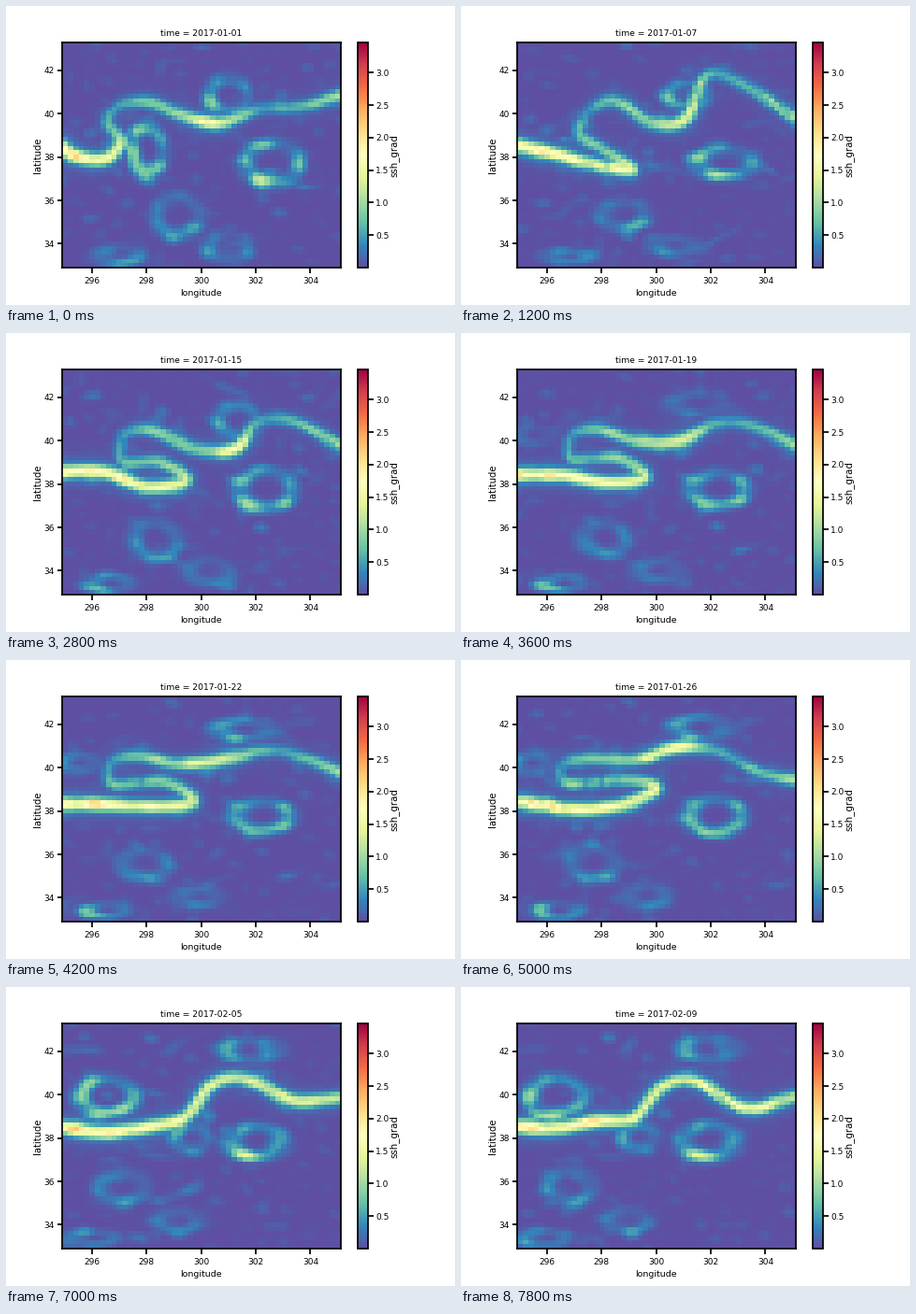
Recreate the animation shown at these times as a matplotlib script. Size 480 by 320 pixels, loop 8 s.

```python
import math

import matplotlib.pyplot as plt
import numpy as np
from matplotlib.animation import FuncAnimation

W, H, DPI = 480, 320, 100
LEFT, RIGHT, TOP, BOTTOM = 60, 357.5, 38.5, 280
NX, NY, DAYS, VMAX = 51, 52, 40, 3.474

# Cell centres in stage pixels, y downwards.
X, Y = np.meshgrid(
    LEFT + (np.arange(NX) + 0.5) * (RIGHT - LEFT) / NX,
    BOTTOM - (np.arange(NY) + 0.5) * (BOTTOM - TOP) / NY,
)

# Centre line of the folded jet on a few days, and of the jet after the fold pinches off.
FOLDED = {
    0: [(58, 150), (75, 161), (105, 164), (123, 148), (118, 137), (108, 124), (122, 107),
        (152, 103), (185, 116), (225, 126), (270, 111), (315, 108), (360, 95)],
    6: [(58, 149), (95, 157), (130, 167), (182, 176), (152, 154), (126, 136), (138, 112),
        (165, 102), (205, 126), (240, 121), (262, 75), (303, 85), (360, 123)],
    14: [(58, 149), (105, 149), (150, 165), (192, 158), (165, 139), (125, 137), (127, 110),
         (155, 104), (200, 124), (245, 124), (268, 96), (308, 95), (360, 123)],
    21: [(58, 154), (110, 155), (160, 157), (200, 152), (170, 131), (115, 133), (112, 110),
         (142, 103), (185, 112), (228, 108), (278, 97), (315, 104), (360, 122)],
    25: [(58, 151), (120, 160), (170, 156), (208, 138), (180, 129), (115, 132), (108, 113),
         (135, 106), (185, 107), (230, 94), (275, 98), (320, 121), (360, 129)],
}
OPEN = {
    31: [(58, 151), (110, 160), (165, 155), (200, 137), (225, 102), (265, 97), (310, 114), (360, 121)],
    39: [(58, 149), (95, 152), (145, 144), (185, 140), (215, 107), (250, 101), (305, 130), (360, 117)],
}
FOLDED_POWER = (2.1, 1.9, 1.7, 1.4, 0.9, 0.7, 0.45, 0.9, 1.0, 1.6, 0.6, 0.7, 1.1)
OPEN_POWER = (1.9, 2.0, 1.9, 1.6, 1.5, 1.4, 1.6, 1.1)

# Eddies: first day, last day, start, end, radii, strength.
EDDIES = (
    (-9, 49, (289, 169), (260, 165), (28, 17), 0.55),
    (-9, 49, (199, 228), (100, 210), (23, 16), 0.3),
    (-9, 49, (250, 259), (163, 248), (20, 10), 0.24),
    (-9, 49, (128, 267), (84, 269), (20, 7), 0.28),
    (-4, 4, (152, 152), (150, 155), (17, 20), 0.6),
    (-4, 18, (235, 97), (250, 94), (20, 15), 0.36),
    (16, 49, (250, 77), (272, 61), (27, 11), 0.36),
    (24, 49, (122, 117), (88, 118), (28, 20), 0.6),
    (26, 49, (217, 166), (167, 153), (17, 14), 0.28),
    (16, 30, (78, 110), (74, 112), (18, 9), 0.3),
)


def smooth(u):
    u = np.clip(u, 0, 1)
    return u * u * (3 - 2 * u)


def keyed(track, day):
    days = list(track)
    pts = np.array(list(track.values()), float)
    i = int(np.clip(np.searchsorted(days, day, "right") - 1, 0, len(days) - 2))
    u = np.clip((day - days[i]) / (days[i + 1] - days[i]), 0, 1)
    return pts[i] + (pts[i + 1] - pts[i]) * u


def spline(pts, n=9):
    """Catmull-Rom curve through the points."""
    p = np.vstack([2 * pts[0] - pts[1], pts, 2 * pts[-1] - pts[-2]])
    u = np.linspace(0, 1, n)[:, None]
    return np.vstack([
        b + 0.5 * u * (c - a + u * (2 * a - 5 * b + 4 * c - d + u * (3 * (b - c) + d - a)))
        for a, b, c, d in zip(p, p[1:], p[2:], p[3:])
    ])


def ridge(track, power, day):
    pts = np.column_stack([keyed(track, day), power])
    x, y, amp = spline(pts).T[:, :, None, None]
    d2 = (X - x) ** 2 + (Y - y) ** 2
    return (amp * (0.88 * np.exp(-d2 / 38) + 0.12 * np.exp(-d2 / 260))).max(axis=0)


def eddy(day, first, last, start, end, radii, amp):
    """A ring that drifts, breathes and is brighter on its south-west side."""
    u = (day - first) / (last - first)
    x, y = np.array(start) * (1 - u) + np.array(end) * u
    rx, ry = radii
    ry *= 1 + 0.25 * math.cos(0.45 * day) * math.exp(-day / 25)
    gap = (np.hypot((X - x) / rx, (Y - y) / ry) - 1) * math.sqrt(rx * ry)
    side = 1 + 0.4 * np.cos(np.arctan2(Y - y, X - x) - math.radians(130))
    fade = smooth((day - first) / 4) * smooth((last - day) / 4)
    return fade * amp * side * np.exp(-gap**2 / 65)


rng = np.random.default_rng(7)
STREAKS = [
    (rng.uniform(LEFT, RIGHT), rng.uniform(TOP, BOTTOM), rng.uniform(10, 26), rng.uniform(3, 6),
     rng.uniform(-0.5, 0.6), rng.uniform(0.1, 0.24), rng.uniform(0, DAYS))
    for _ in range(34)
]
WAVES = [
    (rng.uniform(0.08, 0.35), rng.uniform(0, math.tau), rng.uniform(0, math.tau), rng.uniform(-0.3, 0.3))
    for _ in range(14)
]


def streak(day, x, y, rx, ry, tilt, amp, peak):
    """A faint patch that drifts west and lives for about two weeks."""
    c, s = math.cos(tilt), math.sin(tilt)
    dx, dy = X - x + 0.8 * (day - peak), Y - y
    r2 = ((dx * c + dy * s) / rx) ** 2 + ((dy * c - dx * s) / ry) ** 2
    return amp * smooth(1 - abs(day - peak) / 9) * np.exp(-r2)


def ripple(day):
    total = sum(
        np.sin(k * (X * math.cos(a) + Y * math.sin(a)) + phase + speed * day)
        for k, a, phase, speed in WAVES
    )
    return total / math.sqrt(len(WAVES) / 2)


def field(day):
    pinch = smooth((day - 25) / 6)
    noise = ripple(day)
    jet = np.maximum((1 - pinch) * ridge(FOLDED, FOLDED_POWER, day), pinch * ridge(OPEN, OPEN_POWER, day))
    faint = [eddy(day, *e) for e in EDDIES] + [streak(day, *s) for s in STREAKS]
    faint = np.max(faint, axis=0) * np.clip(1 + 0.35 * noise, 0.2, 1.7)
    return np.maximum(jet * (1 + 0.08 * noise), faint) + 0.02 * noise**2


def px(n):
    return n * 72 / DPI


def box(x0, y0, x1, y1):
    return [x0 / W, 1 - y1 / H, (x1 - x0) / W, (y1 - y0) / H]


def label(x, y, text, size, rotation=0):
    return fig.text(x / W, 1 - y / H, text, fontsize=px(size), rotation=rotation,
                    ha="center", va="center")


plt.rcParams.update({"font.family": "DejaVu Sans", "axes.linewidth": 1.25})
fig = plt.figure(figsize=(W / DPI, H / DPI), dpi=DPI, facecolor="white")
ax = fig.add_axes(box(LEFT, TOP, RIGHT, BOTTOM))
image = ax.imshow(field(0), origin="lower", aspect="auto", interpolation="nearest",
                  extent=(294.9, 305.1, 32.9, 43.3), cmap="Spectral_r", vmin=0, vmax=VMAX)
ax.set_xticks(range(296, 305, 2))
ax.set_yticks(range(34, 43, 2))
cax = fig.add_axes(box(376, TOP, 387, BOTTOM))
fig.colorbar(image, cax=cax, ticks=np.arange(0.5, 3.1, 0.5), format="%.1f")
for a in (ax, cax):
    a.tick_params(length=px(5.5), width=1.25, pad=px(2.5), labelsize=px(9))
ax.tick_params(axis="x", pad=px(4.5))

title = label(208.5, 30, "", 9.1)
label(208.5, 307, "longitude", 9.5)
label(34, 160, "latitude", 10, 90)
label(415, 160, "ssh_grad", 10.2, 90)


def draw(day):
    image.set_data(field(day))
    title.set_text(f"time = {np.datetime64('2017-01-01') + day}")
    return image, title


anim = FuncAnimation(fig, draw, frames=DAYS, interval=200, repeat=True, repeat_delay=0, blit=False)
plt.show()
```
